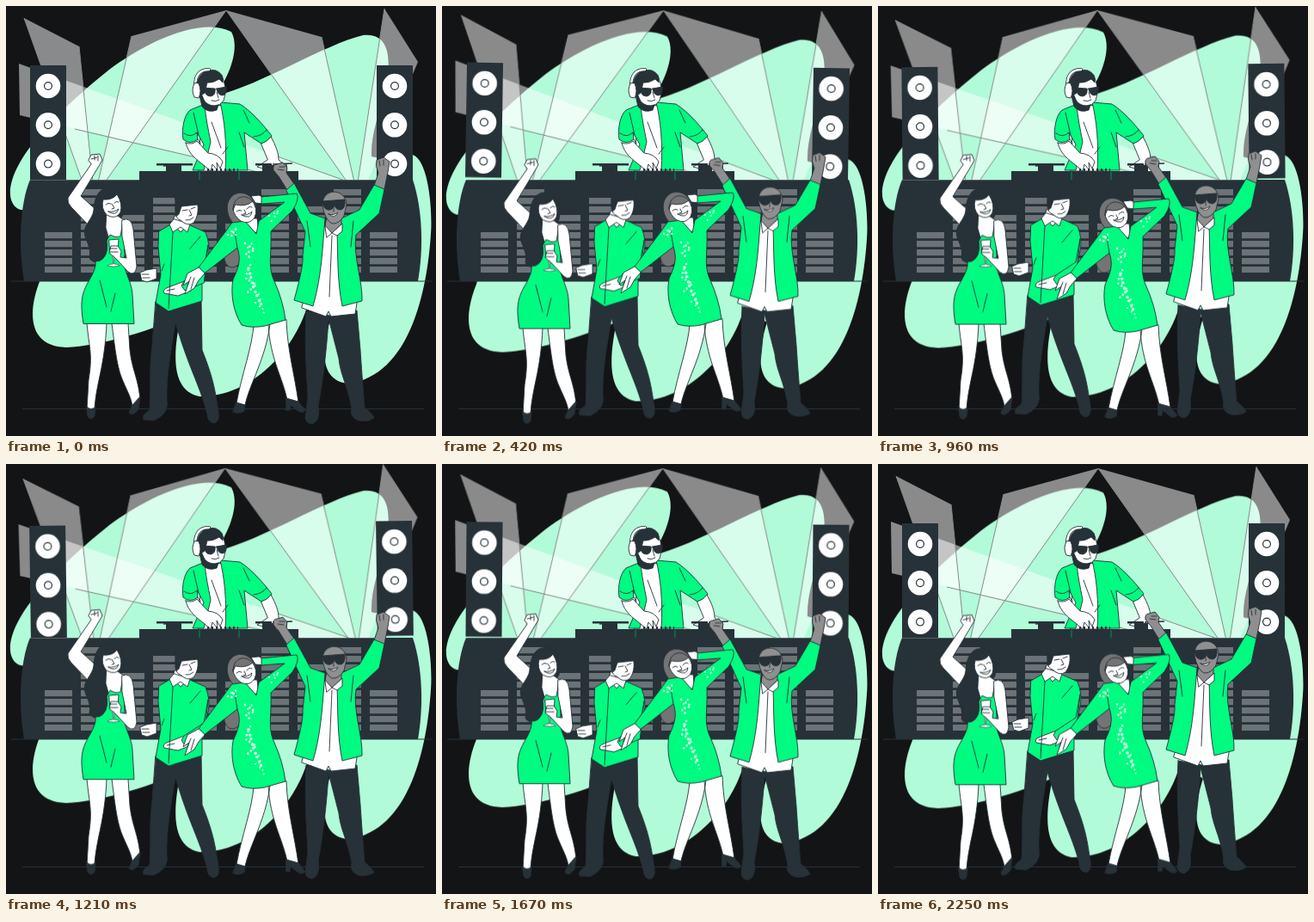
Recreate the animation shown at these times as an HTML page without scripts. Size 500 by 500 pixels, loop 2.29 s.

```html
<!DOCTYPE html>
<html lang="en">
<head>
<meta charset="utf-8">
<title>Dance party</title>
<style>
html, body { margin: 0; width: 100%; height: 100%; overflow: hidden; background: #131416; }
svg { display: block; width: 100vw; height: 100vh; }

.ink { fill: #263238; }
.green { fill: #00fb81; }
.white { fill: #fff; }
.grey { fill: #8f8f8f; }
.line { fill: none; stroke: #263238; }
.person { stroke: #263238; stroke-width: .9; stroke-linejoin: round; stroke-linecap: round; }
.sequins { fill: none; stroke: #d8ffec; stroke-linecap: round; stroke-dasharray: 0 6.5 0 4.6; }

/* 55 held poses per loop; steps() counts the poses in each stretch */
.sway, .rise, .bob, .dip { animation: 2290ms -2ms infinite; }
.sway { animation-name: sway; }
.lights { transform-origin: 247px 102px; }
.speakers { transform-origin: 250px 136px; }
.rise { animation-name: rise; }
.bob { animation-name: bob; }
.dip { animation-name: dip; }

@keyframes sway {
  0% { transform: rotate(0deg); animation-timing-function: steps(9); }
  16.3636% { transform: rotate(1deg); animation-timing-function: steps(18); }
  49.0909% { transform: rotate(-1deg); animation-timing-function: steps(18); }
  81.8182% { transform: rotate(1deg); animation-timing-function: steps(10); }
  100% { transform: rotate(-.111deg); }
}
@keyframes rise {
  0% { transform: translateY(0); animation-timing-function: steps(18); }
  32.7273% { transform: translateY(-10px); animation-timing-function: steps(18); }
  65.4545% { transform: translateY(0); animation-timing-function: steps(18); }
  98.1818% { transform: translateY(-10px); animation-timing-function: steps(1); }
  100% { transform: translateY(-9.44px); }
}
@keyframes bob {
  0% { transform: translateY(0); animation-timing-function: steps(12); }
  21.8182% { transform: translateY(6.67px); animation-timing-function: steps(18); }
  54.5455% { transform: translateY(-3.33px); animation-timing-function: steps(18); }
  87.2727% { transform: translateY(6.67px); animation-timing-function: steps(7); }
  100% { transform: translateY(2.78px); }
}
@keyframes dip {
  0% { transform: translateY(0); animation-timing-function: steps(6); }
  10.9091% { transform: translateY(-3.33px); animation-timing-function: steps(18); }
  43.6364% { transform: translateY(6.67px); animation-timing-function: steps(18); }
  76.3636% { transform: translateY(-3.33px); animation-timing-function: steps(13); }
  100% { transform: translateY(3.89px); }
}
</style>
</head>
<body>
<svg viewBox="0 0 500 500">
  <defs>
    <pattern id="bars" y="263" width="10" height="10" patternUnits="userSpaceOnUse">
      <rect width="10" height="7.2" fill="#6b7377"/>
    </pattern>
    <g id="cone">
      <circle r="14.3" class="white"/>
      <circle r="4.4" class="line" stroke-width="1.2"/>
    </g>
    <g id="speaker">
      <path class="ink" d="M-21-24H21V109.500H-21z"/>
      <use href="#cone"/><use href="#cone" y="45.300"/><use href="#cone" y="90.600"/>
    </g>
  </defs>

  <rect width="500" height="500" fill="#131416"/>

  <path class="bob" fill="#b1fbd8" d="M5 220C3 180 60 122 120 74C160 44 225 11 262 30C273 50 258 85 243 105C300 90 370 45 415 34C450 30 447 70 441 95C434 125 424 150 425 175C440 180 455 168 473 173C492 180 496 240 494 265C490 330 470 430 398 439C365 436 366 400 378 362L350 350C335 400 285 455 225 454C190 447 195 400 203 362C160 380 110 395 70 397C25 396 25 355 40 318L60 238L30 235C15 242 6 232 5 220z"/>

  <g class="sway lights">
    <g fill="#fff" fill-opacity=".5">
      <path d="M21 14L85 47L101 205H89z"/>
      <path d="M15 67L397 204H340L16 127z"/>
      <path d="M256 5L146 35L107 205H115z"/>
      <path d="M256 5L367 36L405 205H397z"/>
      <path d="M440 3L479 65L420 205H409z"/>
    </g>
    <path fill="none" stroke="#858b89" d="M85 47L101 205M80 143L340 204M310 173L397 204M146 35L107 205M256 5L115 205M256 5L397 205M367 36L405 205M440 3L409 205M21 14L89 205"/>
  </g>

  <g class="sway speakers">
    <use href="#speaker" x="49" y="93"/>
    <use href="#speaker" x="452" y="93"/>
  </g>

  <!-- booth -->
  <path class="ink" d="M28 202H473C484 235 486 280 479 320H21C14 280 16 230 28 202z"/>
  <path fill="url(#bars)" d="M45 263h32v47H45zM87 212h32v98H87zM129 243h32v67h-32zM171 223h32v87h-32zM213 243h32v67h-32zM255 253h32v57h-32zM297 213h32v97h-32zM339 233h32v77h-32zM381 213h32v97h-32zM423 263h32v47h-32z"/>
  <path class="line" d="M6 320H495M19 468.500H486"/>

  <!-- DJ -->
  <g class="person">
    <path class="white" d="M228 120L242 115L254 116L262 192H224z"/>
    <path class="green" d="M231 114L214 121C207 127 204 143 206 155Q214 162 223 155L222 147L230 161L217 191H230L238 158C235 142 232 130 231 114z"/>
    <path class="green" d="M249 112L272 114C285 122 300 139 309 151Q305 159 297 160L277 147L281 191H255C257 160 254 132 249 112z"/>
    <path class="white" d="M209 159Q216 162 222 157L235 171Q247 172 252 181L249 189L245 182L246 191L240 184L238 192L231 186C221 178 212 172 209 159z"/>
    <path class="white" d="M297 160Q304 158 308 152C314 163 317 171 317 179Q323 184 327 187L314 185L303 190L292 187L304 179z"/>
    <path class="line" d="M271 147L277 164M218 124L224 150M276 121L283 136M239 135L250 165M252 172L258 164M207 148Q215 154 222 147M288 152Q298 151 303 144M223 155L226 160"/>
    <path class="white" d="M230 90L251 82Q258 96 253 110Q245 120 234 115L226 104z"/>
    <path class="ink" d="M227 102L231 111Q238 118 247 115L245 121Q235 125 228 117L225 104z"/>
    <path class="ink" d="M222 99C220 80 232 72 244 75Q254 79 252 89L248 85Q240 90 234 89L231 101L227 104z"/>
    <path class="ink" d="M230 95L243 96Q244 104 238 105Q231 105 230 95zM245 96L256 94Q257 103 252 104Q246 104 245 96z"/>
    <path class="line" d="M239 110Q244 112 248 109M243 97H246M245 100L247 107"/>
    <path class="line" stroke-width="4" d="M220 93C220 80 226 74 236 74"/>
    <path fill="none" stroke="#fff" stroke-width="2.400" d="M220 93C220 80 226 74 236 74"/>
    <path class="white" d="M219 90Q215 98 219 106L224 107Q228 99 224 90z"/>
  </g>

  <!-- decks -->
  <path class="ink" d="M155 192H340V203H155zM175 183H217V185.500H175zM186 185H204V192H186zM290 183H309V185.500H290zM298 185H314V192H298z"/>
  <path stroke="#263238" stroke-width="1.500" fill="none" d="M183 186L203 184M310 184L333 183M326 192V184"/>
  <path stroke="#263238" stroke-width="3" stroke-dasharray="2 3" d="M234 190.500H270"/>
  <path stroke="#6b7377" stroke-width=".7" d="M28 202.500H155M340 202.500H431"/>
  <path stroke="#00a85e" stroke-width=".8" d="M225 193V202M271 193V202"/>

  <!-- man in the long jacket -->
  <g class="person rise">
    <path class="ink" d="M349 355L376 360L408 354L412 400C414 430 416 455 417 467Q426 474 428 479Q420 484 410 482Q399 478 402 468C397 440 389 430 387 410L375 363C373 400 368 440 363 465Q366 482 356 486Q348 485 348 478L351 455C349 420 347 390 349 355z"/>
    <path class="white" d="M370 256L391 256L399 300L408 345L406 358L378 361L375 355L372 361L344 351z"/>
    <path class="grey" d="M327 214L317 198L311 191Q310 184 315 184L322 182L327 188L326 194L335 207z"/>
    <path class="grey" d="M428 209L433 194Q429 186 431 179L439 176L446 181L444 193L440 213z"/>
    <path class="green" d="M326 214L335 206L354 241L371 247L369 272C367 300 364 325 357 349L335 342C341 320 346 300 345 290L348 263z"/>
    <path class="green" d="M390 247L411 237L428 208L440 213L434 241L407 266C403 290 415 320 414 343L391 349C385 320 386 290 385 262z"/>
    <path class="grey" d="M373 246H390V254L379 264L371 257z"/>
    <path class="white" d="M371 255L379 264L391 253V262L385 267L379 264L373 269z"/>
    <path class="grey" d="M368 232C367 211 395 211 396 231L393 244Q387 254 379 253Q371 249 368 232z"/>
    <path class="ink" d="M368 227L394 225Q395 236 389 237Q383 237 382 231Q380 238 374 237Q369 236 368 227z"/>
    <path class="white" d="M375 242Q381 244 386 240Q383 248 375 242z"/>
    <path class="line" d="M379 267L376 338M318 187L324 187M316 190L323 191M434 180L435 186M439 179V185M350 250L354 280M404 250L401 280M381 233V239"/>
  </g>

  <!-- man in the shirt -->
  <g class="person rise">
    <path class="ink" d="M174 344L189 354L227 342L228 400C240 430 243 445 246 466Q250 483 242 485Q234 484 234 474C225 440 212 420 197 368C192 400 186 430 187 458Q190 474 172 482L160 481Q157 476 167 470C169 440 166 430 170 395z"/>
    <path class="white" d="M156 310L163 307L175 305V317L164 321L158 319z"/>
    <path class="green" d="M178 262L193 253L204 262L212 254L232 263Q238 278 235 292L228 318V343L189 355L174 345L180 312L177 280z"/>
    <path class="white" d="M196 244H212V254L203 263L194 253z"/>
    <path class="white" d="M195 248L190 254L194 263L203 257L211 263L214 254z"/>
    <path class="white" d="M200 234L222 227C225 238 222 247 218 252Q211 257 203 249C197 248 195 237 200 234z"/>
    <path class="ink" d="M198 244C195 235 199 227 195 220L205 221L210 217L221 220L225 223L223 231L204 233L201 242z"/>
    <path class="white" d="M210 319L189 327Q181 330 184 334L200 337L215 331z"/>
    <path class="green" d="M235 278L230 305L207 320L204 325L208 331L230 322z"/>
    <path class="line" d="M194 263L189 352M214 282L226 268M158 312H166M159 316H167M187 331L196 329M205 238L211 237M215 236L220 234M209 249Q214 250 218 246M213 237L216 243L213 244M184 300L181 308"/>
  </g>

  <!-- woman in sequins -->
  <g class="person dip">
    <path fill="#747474" d="M291 235C288 217 270 213 262 222C254 230 257 245 264 252C268 262 251 280 254 295C258 307 266 305 271 300L280 255z"/>
    <path class="white" d="M288 370C287 395 274 428 268 462L278 464C283 440 302 410 307 370zM305 370C307 410 321 430 327 458L340 461C336 430 327 400 326 365z"/>
    <path class="ink" d="M268 461L278 464L277 471Q270 475 264 472zM326 456L340 460L348 470Q343 475 337 469L331 464L330 470H326z"/>
    <path class="white" d="M300 230L290 229L285 221L294 220L300 223zM278 247H292L294 264L282 262z"/>
    <path class="green" d="M263 252L278 250L291 265L294 250L324 228L297 230V222L338 218Q342 224 333 238L308 262C309 290 304 303 312 320Q322 342 325 365L301 372Q286 375 274 371C264 355 261 335 264 318C270 305 274 295 269 281L229 312L224 304L254 264z"/>
    <path class="white" d="M224 304L211 311L206 325L213 320L208 335L219 328L224 319L231 311z"/>
    <path class="white" d="M267 228Q278 233 285 225Q294 236 289 246Q283 255 273 250Q265 244 264 236z"/>
    <path fill="#747474" d="M264 237C264 222 277 217 287 227Q279 234 267 231z"/>
    <path class="line" d="M268 239Q271 236 274 238M280 236Q283 232 286 234M277 237L279 241L276 242M215 315L211 325M219 316L215 329M269 281L266 263"/>
    <path class="white" d="M274 243Q281 244 286 239Q285 249 274 243z"/>
    <g class="sequins">
      <path stroke-width="2.700" d="M258 266L268 259L259 272M278 276L290 284L278 287L287 296M284 301L278 316L291 324L281 333"/>
      <path stroke-width="3.600" d="M282 305L288 328L297 348"/>
      <path stroke-width="2.200" d="M262 262L270 268M281 281L286 276M294 335L300 358M290 345L297 351M306 244L318 238L308 251"/>
    </g>
  </g>

  <!-- woman with a glass -->
  <g class="person bob">
    <path class="white" d="M94 369C97 400 101 405 96 435L94 470L103 471C104 440 115 420 117 369zM123 369C127 400 129 420 136 436C141 448 146 456 147 466L156 457C153 430 147 425 144 400L142 369z"/>
    <path class="ink" d="M94 466Q99 471 104 466L103 477Q98 483 95 477zM147 464L156 454L154 469Q147 478 143 473z"/>
    <path class="white" d="M99 184L72 223Q71 229 76 234L98 257L107 239L87 221L108 186L112 179L109 172L99 173L96 179z"/>
    <path class="ink" d="M121 211C108 211 103 222 102 237C101 249 88 255 92 268C95 277 99 282 97 293C104 303 118 299 120 283L124 262L136 243C139 228 134 211 121 211z"/>
    <path class="white" d="M117 240L130 244L137 249V268L120 272L116 258z"/>
    <path class="green" d="M110 285L121 266Q127 270 133 268L136 250L138 290C133 303 146 318 147 335L149 369.500H90C86 345 88 335 95 322C102 310 105 303 104 297Q109 296 110 285z"/>
    <path class="ink" d="M116 246C113 267 121 275 116 289Q110 301 98 295L101 262z"/>
    <path class="white" d="M113 225Q124 226 129 219Q136 230 133 240Q128 249 117 243Q110 235 113 225z"/>
    <path class="white" d="M120 272L131 271L130 287Q125 292 121 287z"/>
    <path class="white" d="M135 249Q146 244 148 260L152 303Q150 315 142 309L128 294L120 287L122 279L130 279L134 285L133 292L140 293L135 268z"/>
    <path class="white" d="M124.300 291H125.700V300Q131 300 132 302Q125 304 118 302Q119 300 124.300 300z" stroke-width=".6"/>
    <path class="line" d="M121 282H129M121 286H130M99 178L106 176M103 174V179M107 174V180M116 231Q119 228 122 230M126 229Q129 226 131 228M123 230L126 235L123 236M109 319L117 350M127 334L122 355"/>
    <path class="white" d="M119 239Q126 240 131 236Q128 245 119 239z"/>
  </g>
</svg>
</body>
</html>
```
